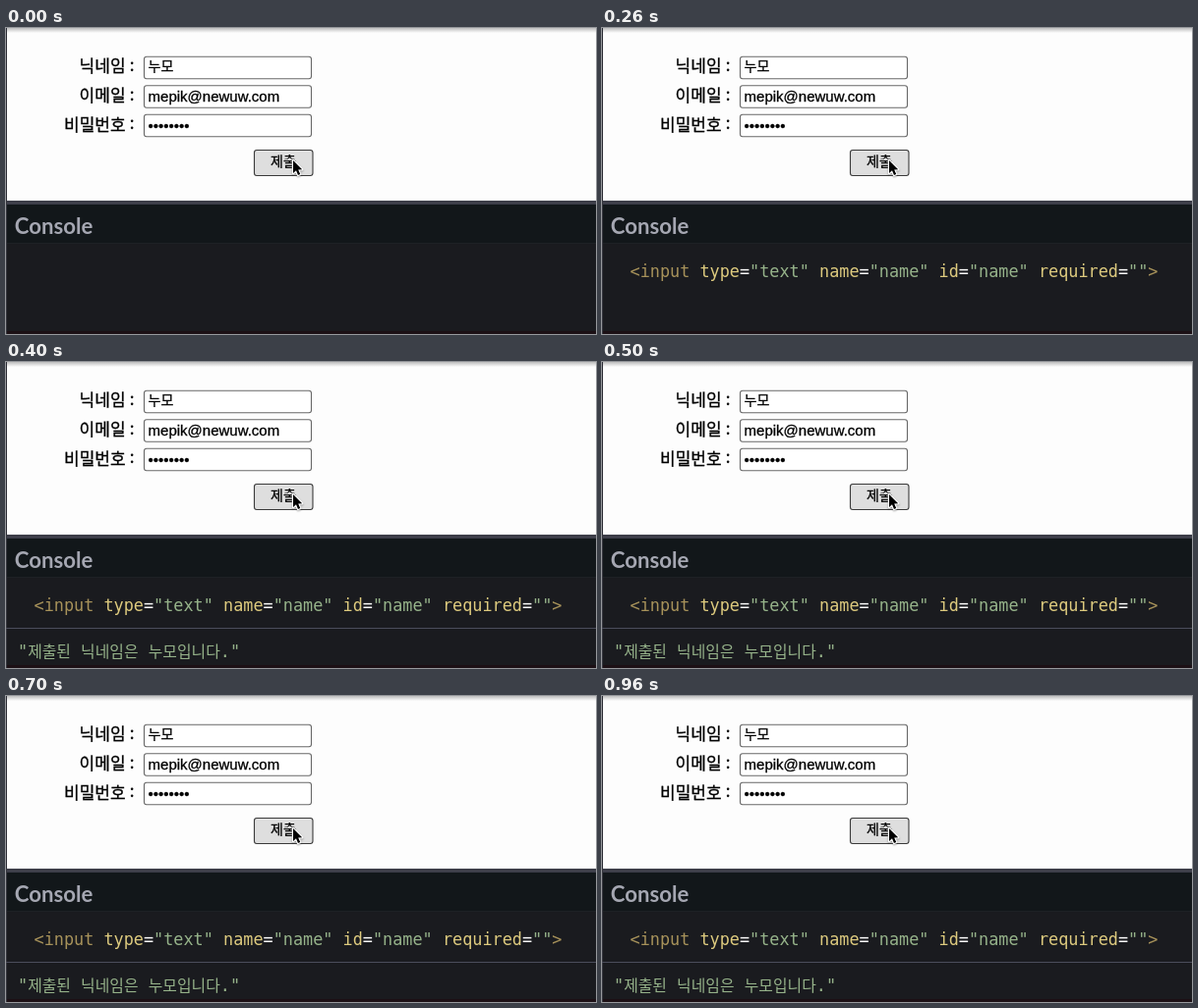
These frames come from a looping animation (600x312 px, 1000 ms). An HTML page with a canvas:

```html
<!DOCTYPE html>
<html lang="ko">
<head>
<meta charset="utf-8">
<title>Form submit</title>
<style>
html, body { margin: 0; width: 100%; height: 100%; overflow: hidden; background: #fdfdfd; }
canvas { display: block; width: 600px; height: 312px; }
</style>
</head>
<body>
<canvas id="stage" width="600" height="312"></canvas>
<script>
const ctx = document.getElementById('stage').getContext('2d');
const LOOP = 1000;
const KR = '"Noto Sans CJK KR", "Noto Sans CJK", sans-serif';
const ARIAL = '"Liberation Sans", Arial, sans-serif';
const MONO = '16.83px "DejaVu Sans Mono", monospace';
const TAG = '#a7925a', ATTR = '#ddca7e', STR = '#96b38a', OP = '#ffffff';
const NICK = '누모';

function rect(x, y, w, h, color) {
  ctx.fillStyle = color;
  ctx.fillRect(x, y, w, h);
}

// Draws text and returns the x where it ends.
function text(str, x, y, font, color) {
  ctx.font = font;
  ctx.fillStyle = color;
  ctx.fillText(str, x, y);
  return x + ctx.measureText(str).width;
}

// Black form text with slightly heavier stems.
function ink(str, x, y, font) {
  text(str, x, y, font, '#000');
  ctx.strokeStyle = '#000';
  ctx.lineWidth = 0.3;
  ctx.strokeText(str, x, y);
}

function box(x, y, w, h, fill, stroke) {
  ctx.beginPath();
  ctx.roundRect(x + 0.5, y + 0.5, w - 1, h - 1, 2.5);
  ctx.fillStyle = fill;
  ctx.fill();
  ctx.strokeStyle = stroke;
  ctx.lineWidth = 1.1;
  ctx.stroke();
}

function form(pressed) {
  rect(0, 0, 600, 176, '#fdfdfd');
  const shade = ctx.createLinearGradient(0, 0, 0, 5);
  shade.addColorStop(0, '#bdbdbd');
  shade.addColorStop(1, '#fdfdfd');
  rect(0, 0, 600, 5, shade);
  rect(0, 0, 1, 176, '#2c2d36');

  [['닉네임', 74.6], ['이메일', 74.6], ['비밀번호', 59]].forEach(([label, x], i) => {
    const y = 45 + i * 29.75;
    ink(label, x, y, '17px ' + KR);
    ink(':', 125.8, y - 1.2, '17px ' + KR);
    box(140, 28.7 + i * 29.5, 171, 23.6, '#fff', '#686868');
  });

  ink(NICK, 144.5, 44.3, '14px ' + KR);
  ink('mepik@newuw.com', 144.6, 75, '15px ' + ARIAL);
  ink('•'.repeat(8), 144.5, 105, '15px ' + ARIAL);

  box(252, 124, 60.5, 27, pressed ? '#dedede' : '#f0f0f0', pressed ? '#3a3a3a' : '#757575');
  ink('제출', 269, 141.4, '14px ' + KR);
}

function cursor() {
  const points = [[0, 0], [0, 13], [3, 10.3], [5, 15], [7.2, 14.1], [5.2, 9.4], [9.2, 9.2]];
  ctx.save();
  ctx.translate(292, 135);
  ctx.beginPath();
  points.forEach(([x, y]) => ctx.lineTo(x, y));
  ctx.closePath();
  ctx.lineJoin = 'round';
  ctx.lineWidth = 2.4;
  ctx.strokeStyle = '#fff';
  ctx.shadowColor = 'rgba(0,0,0,.35)';
  ctx.shadowBlur = 2;
  ctx.shadowOffsetY = 1;
  ctx.stroke();
  ctx.shadowColor = 'transparent';
  ctx.fillStyle = '#000';
  ctx.fill();
  ctx.restore();
}

function panel() {
  rect(0, 176, 600, 136, '#1a1b1f');
  rect(0, 180, 600, 39, '#12171a');
  rect(0, 176, 600, 4, '#3d3e49');
  rect(0, 219, 600, 1, '#1e2125');
  rect(0, 309, 600, 3, '#1c1015');
  rect(0, 176, 1, 136, '#33343c');
  text('Console', 8.7, 209.6, 'bold 22.2px Lato, sans-serif', '#a5a7b2');
}

function markup() {
  let x = 28.5;
  const put = (str, color) => { x = text(str, x, 254, MONO, color); };
  put('<input', TAG);
  for (const [key, value] of [['type', 'text'], ['name', 'name'], ['id', 'name'], ['required', '']]) {
    put(' ' + key, ATTR);
    put('=', OP);
    put('"' + value + '"', STR);
  }
  put('>', TAG);
}

function message() {
  rect(0, 271, 600, 1, '#4b4d5b');
  let x = 12;
  for (const part of ['"', '제출된', ' ', '닉네임은', ' ', NICK + '입니다', '."'])
    x = text(part, x, 301, /[가-힣]/.test(part) ? '15.9px ' + KR : MONO, STR);
}

function draw(t) {
  form(t < 160 || t >= 260);
  cursor();
  panel();
  if (t >= 260) markup();
  if (t >= 300) message();
}

const start = performance.now();
function tick() {
  draw((performance.now() - start) % LOOP);
  requestAnimationFrame(tick);
}
tick();
</script>
</body>
</html>
```
